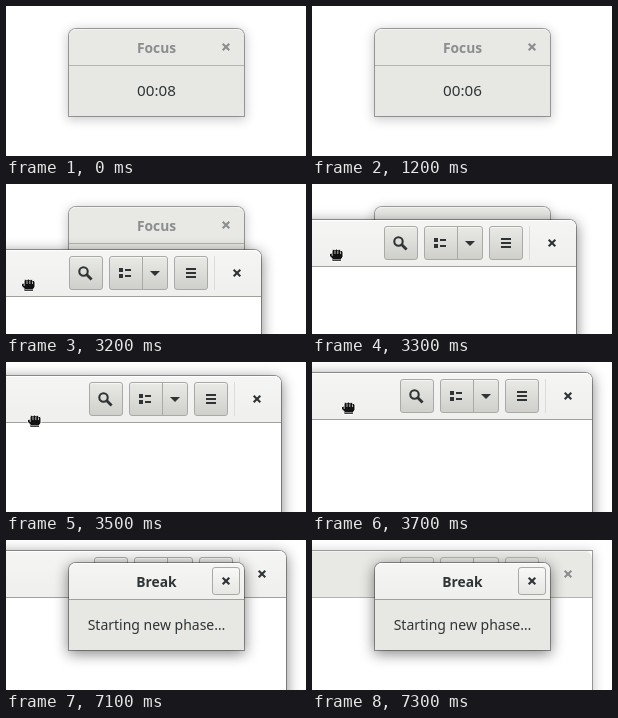
Write an HTML page that moves like this. It is 300 px wide and 150 px high and loops after 8000 ms.

```html
<!DOCTYPE html>
<html lang="en">
<head>
<meta charset="utf-8">
<title>Focus timer</title>
<style>
  html, body { margin: 0; width: 100%; height: 100%; overflow: hidden; background: #fff; }
  #stage { position: relative; width: 300px; height: 150px; overflow: hidden;
    font: 14px "Noto Sans", sans-serif; color: #2e3436; }
  #stage * { box-sizing: border-box; }
  .abs, .window, .header, .button, .icon, .body, .title, .cursor { position: absolute; }

  .window { border-radius: 7px 7px 0 0;
    box-shadow: 0 3px 14px 1px rgba(0,0,0,.47), 0 0 0 1px rgba(0,0,0,.36); }
  .window.backdrop { box-shadow: 0 2px 11px 2px rgba(0,0,0,.2), 0 0 0 1px rgba(0,0,0,.34); }
  .header { inset: 0 0 auto 0; border-radius: 7px 7px 0 0; border-bottom: 1px solid #a0a09d;
    background: linear-gradient(#f5f5f4, #efefed); box-shadow: inset 0 1px #fff; }
  .backdrop .header { background: #e8e8e4; border-color: #b4b5b0; color: #8b8e8f;
    box-shadow: inset 0 1px #f3f3f1; }

  .dialog { left: 63px; top: 23px; width: 175px; height: 87px; background: #e7e8e3; }
  .dialog .header { height: 37px; }
  .title { inset: 0; font-weight: bold; font-size: 13.8px; line-height: 37px; text-align: center; }
  .body { inset: 37px 0 0 0; line-height: 49px; text-align: center; }
  #clock { font-size: 15.2px; }

  .files { width: 600px; height: 400px; background: #fff; }
  .files .header { height: 47px; }
  .files .backdrop { inset: 0; border-radius: inherit; }
  .button { border: 1px solid #a9aaa6; border-radius: 3px;
    background: linear-gradient(#e9e9e6, #cfd0cb); box-shadow: inset 0 1px #f6f6f5; }
  .backdrop .button { background: #e8e8e4; border-color: #b4b5b0; box-shadow: none; }
  .light { background: linear-gradient(#f8f8f7, #e6e6e3); }
  .divider { position: absolute; width: 1px; background: #a9aaa6; }
  .soft { background: #dcdcd9; }
  .icon { overflow: visible; fill: currentColor; stroke: currentColor; stroke-width: 0; }
  .line { fill: none; stroke-width: 2.1; }
</style>
</head>
<body>
<div id="stage"></div>
<script>
const LOOP = 8000;
const stage = document.getElementById('stage');

const box = (cls, right, top, w, h) =>
  `<div class="${cls}" style="right:${right}px;top:${top}px;width:${w}px;height:${h}px"></div>`;
const icon = (right, top, size, shape) =>
  `<svg class="icon" style="right:${right}px;top:${top}px" width="${size}" height="${size}">${shape}</svg>`;
const closeIcon = (right, top) =>
  icon(right, top, 8, '<path class="line" d="M.7 .7L7.3 7.3M7.3 .7L.7 7.3"/>');

const dialog = (id, cls, title, body, button = '') => `
  <div id="${id}" class="window dialog ${cls}">
    <div class="header"><div class="title">${title}</div>${button}${closeIcon(14, 14)}</div>
    ${body}
  </div>`;

const toolbar = `
  <div class="header">
    ${box('button', 158, 6, 34, 34)}
    ${icon(168, 16, 15, '<circle class="line" cx="5.5" cy="5.5" r="4.2"/><path class="line" style="stroke-width:2.8" d="M8.8 8.8L13.6 13.6"/>')}
    ${box('button', 93, 6, 59, 34)}
    ${box('divider', 118, 7, 1, 32)}
    ${icon(129, 18, 13, '<path d="M0 0h4v4H0zM0 6h4v4H0zM6 1h6v2H6zM6 7h6v2H6z"/>')}
    ${icon(101, 21, 10, '<path d="M0 0H10L5 5Z"/>')}
    ${box('button', 53, 6, 34, 34)}
    ${icon(65, 18, 10, '<path d="M0 0h10v2H0zM0 4h10v2H0zM0 8h10v2H0z"/>')}
    ${box('divider soft', 46, 6, 1, 34)}
    ${closeIcon(20, 19)}
  </div>`;

stage.innerHTML = `
  ${dialog('focus', 'backdrop', 'Focus', '<div class="body" id="clock"></div>')}
  <div id="files" class="files abs">
    <div id="active" class="window abs" style="inset:0"></div>
    <div class="abs" style="inset:0;border-radius:7px 7px 0 0;background:#fff">${toolbar}</div>
    <div id="inactive" class="window backdrop">${toolbar}</div>
  </div>
  ${dialog('pause', '', 'Break', '<div class="body">Starting new phase…</div>',
    box('button light', 4, 4, 28, 28))}
  <svg id="hand" class="cursor" width="15" height="14">
    <path fill="#111" stroke="#fff" d="M3 13.5V10.5L.5 8V5.5L3 5V2.5Q4.5 .5 6 2Q7.5 0 9 2Q10.5 .5 11.6 2.5Q13.5 1.8 14 4V9L12.5 11V13.5Z"/>
    <path fill="none" stroke="#fff" stroke-width=".7" d="M6 3V6M8.8 3V6M11.5 3.5V6M3.2 5V8M4 11.8H12"/>
  </svg>
  <svg id="arrow" class="cursor" width="13" height="20">
    <path fill="#111" stroke="#fff" d="M.6 1V16.3L4.2 13L6.6 18.8L9.4 17.6L7 12H12Z"/>
  </svg>`;

// Each track lists [start time, value]; a value holds until the next start.
const tracks = {
  clock: [[0, '00:08'], [200, '00:07'], [1200, '00:06'], [2100, '00:05']],
  files: [[0, null], [3000, [233, 152]], [3100, [244, 107]], [3200, [255, 66]], [3300, [264, 36]],
    [3400, [270, 23]], [3500, [275, 14]], [3600, [278, 12]], [3700, [280, 11]]],
  hand: [[0, null], [3100, [12, 132]], [3200, [15, 94]], [3300, [17, 64]], [3400, [19, 58]],
    [3500, [21, 52]], [3600, [25, 45]], [3700, [29, 39]], [3900, null]],
  arrow: [[0, null], [3900, [40, 42]], [4400, [40, 43]], [4600, [32, 62]], [4700, null]],
  pause: [[0, false], [7100, true]],
  inactive: [[0, 0], [7200, .65], [7300, 1]],
};

const el = id => document.getElementById(id);
const valueAt = (name, t) => tracks[name].findLast(([start]) => start <= t)[1];
const show = (id, on) => { el(id).style.visibility = on ? 'visible' : 'hidden'; };
const place = (id, point, width = 0) => {
  show(id, point);
  if (point) el(id).style.transform = `translate(${point[0] - width}px, ${point[1]}px)`;
};
for (const id of ['files', 'hand', 'arrow']) Object.assign(el(id).style, { left: 0, top: 0 });

function draw(t) {
  el('clock').textContent = valueAt('clock', t);
  place('files', valueAt('files', t), 600);
  place('hand', valueAt('hand', t));
  place('arrow', valueAt('arrow', t));
  show('pause', valueAt('pause', t));
  const fade = valueAt('inactive', t);
  el('inactive').style.opacity = fade;
  el('active').style.opacity = 1 - fade;
}

const begin = performance.now();
function tick() {
  draw((performance.now() - begin) % LOOP);
  requestAnimationFrame(tick);
}
tick();
</script>
</body>
</html>
```
